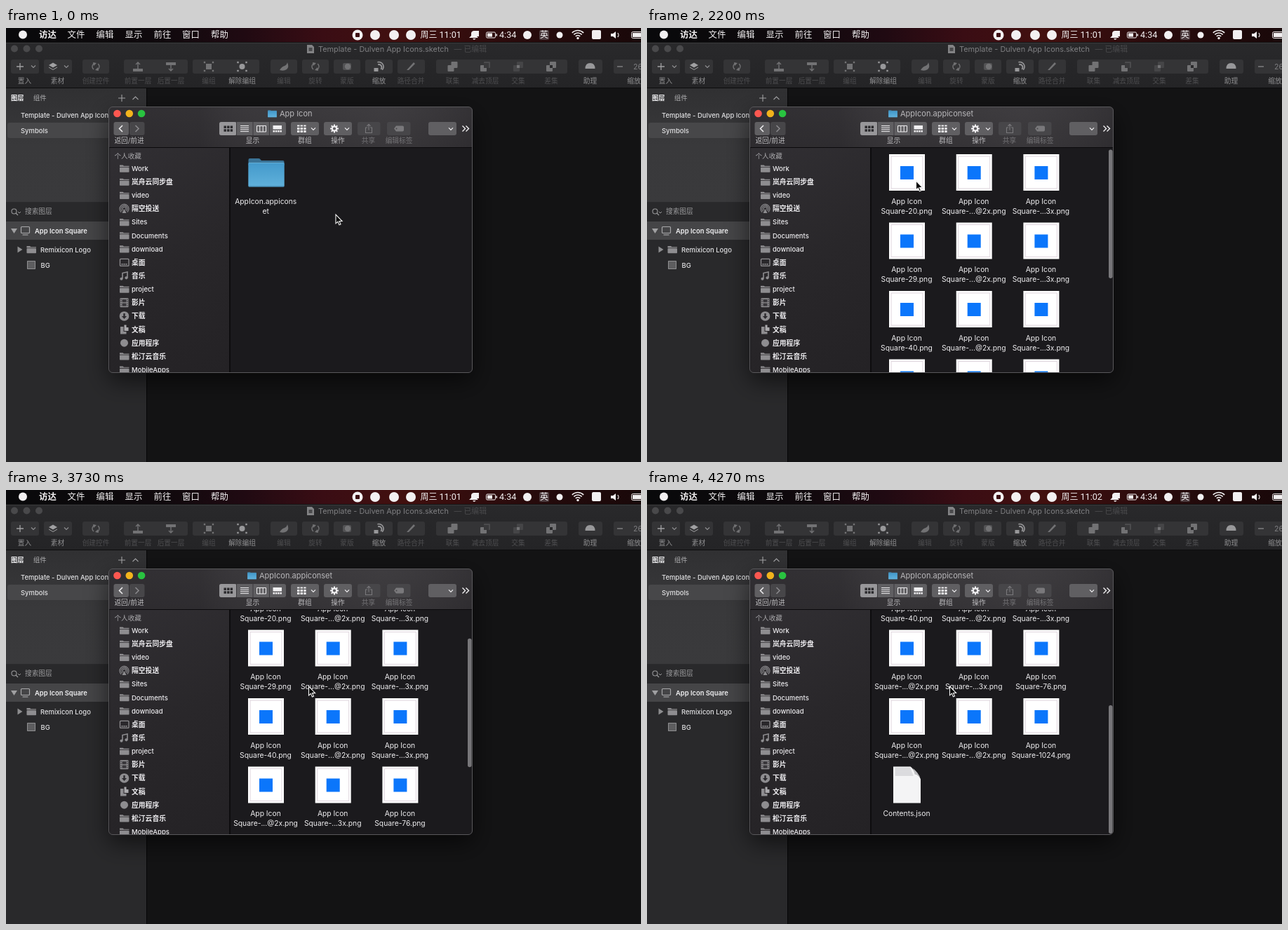
Recreate the animation shown at these times as an HTML page with a canvas. Size 905 by 619 pixels, loop 4340 ms.

```html
<!DOCTYPE html>
<html lang="zh-CN">
<head>
<meta charset="utf-8">
<title>Icon folder</title>
<style>
html, body { margin: 0; width: 100%; height: 100%; overflow: hidden; background: #131314; }
canvas { display: block; width: 905px; height: 619px; }
</style>
</head>
<body>
<canvas id="stage" width="905" height="619"></canvas>
<script>
const ctx = document.getElementById('stage').getContext('2d');
const LOOP = 4340, TICK = 1000 / 15;
const SANS = 'Inter, "Noto Sans CJK SC", "Noto Sans CJK", sans-serif';

// ---------- helpers ----------
function rect(x, y, w, h, color, r = 0) {
  ctx.fillStyle = color;
  ctx.beginPath();
  ctx.roundRect(x, y, w, h, r);
  ctx.fill();
}
function frame(x, y, w, h, color, r = 0, lw = 1) {
  ctx.strokeStyle = color;
  ctx.lineWidth = lw;
  ctx.beginPath();
  ctx.roundRect(x, y, w, h, r);
  ctx.stroke();
}
function disc(x, y, r, color) {
  ctx.fillStyle = color;
  ctx.beginPath();
  ctx.arc(x, y, r, 0, 7);
  ctx.fill();
}
function arc(x, y, r, a, b, color, lw = 1) {
  ctx.strokeStyle = color;
  ctx.lineWidth = lw;
  ctx.beginPath();
  ctx.arc(x, y, r, a, b);
  ctx.stroke();
}
function shape(x, y, d, fill, stroke, lw = 1) {
  const p = new Path2D(d);
  ctx.save();
  ctx.translate(x, y);
  if (fill) { ctx.fillStyle = fill; ctx.fill(p); }
  if (stroke) { ctx.strokeStyle = stroke; ctx.lineWidth = lw; ctx.stroke(p); }
  ctx.restore();
}
const line = (x, y, d, color, lw = 1) => shape(x, y, d, null, color, lw);
// y is the optical middle of the capitals
function text(s, x, y, size, color, { weight = 400, align = 'left', font = SANS } = {}) {
  ctx.font = `${weight} ${size}px ${font}`;
  ctx.textAlign = align;
  ctx.fillStyle = color;
  ctx.fillText(s, x, y + size * 0.36);
}
const label = (s, x, y, size, color, weight) => text(s, x, y, size, color, { weight, align: 'center' });
function ramp(x0, y0, x1, y1, ...stops) {
  const g = ctx.createLinearGradient(x0, y0, x1, y1);
  stops.forEach((c, i) => g.addColorStop(i / (stops.length - 1), c));
  return g;
}
const chevron = (x, y, c) => line(x, y, 'M-3 -1.5L0 1.5L3 -1.5', c, 1.2);

// ---------- motion ----------
// keys: [tick, value, ...]; eased between neighbours
function track(keys, t) {
  if (t <= keys[0][0]) return keys[0].slice(1);
  for (let i = 1; i < keys.length; i++) {
    const a = keys[i - 1], b = keys[i];
    if (t <= b[0]) {
      const u = (t - a[0]) / (b[0] - a[0]);
      const e = b[0] - a[0] > 2 ? u * u * (3 - 2 * u) : u;
      return a.slice(1).map((v, k) => v + (b[k + 1] - v) * e);
    }
  }
  return keys[keys.length - 1].slice(1);
}
const POINTER = [[0, 470, 266], [8, 385, 218.5], [14, 383.5, 218], [34, 383.5, 218],
  [39, 385.5, 219], [43, 431.5, 280.5], [64, 431.5, 280]];
const SCROLL = [[47, 0], [48, 9], [50, 43], [52, 66], [55, 66], [56, 78], [57, 142], [58, 218],
  [59, 264], [60, 277], [61, 278], [64, 273]];
const SELECT = 20, OPEN = 31, MINUTE = 62;

// ---------- menu bar ----------
function menuBar(tick) {
  const white = '#f2f0f1';
  rect(0, 0, 905, 20, ramp(0, 0, 905, 0, '#09090b', '#0b090b', '#10090d', '#200a12', '#3a0d14', '#42100f', '#300c0d', '#220a0b', '#190809'));
  rect(0, 20, 905, 1, '#141415');
  disc(24, 9.5, 6, white);
  ['访达', '文件', '编辑', '显示', '前往', '窗口', '帮助'].forEach((s, i) =>
    label(s, [59.5, 100, 141, 182, 223, 263.5, 304.5][i], 9.5, 12.4, white, i ? 500 : 700));

  disc(501, 10, 7.5, white);
  rect(498, 7, 6, 6, '#3c0e14', 1);
  [526, 553, 577].forEach(x => disc(x, 10, 7, white));
  text('周三', 590.5, 9.7, 12, white, { weight: 500 });
  const clock = { font: 'Roboto, sans-serif' };
  text(tick < MINUTE ? '11:01' : '11:02', 617.5, 9.9, 12.6, white, clock);
  shape(667, 10, 'M-7 4L-4 1V-3Q-3 -6 0 -6H7V2H4L6 4Z M-2 5H3L0 7Z', white);
  frame(684.5, 6, 13, 8, white, 1.5);
  rect(686, 7.5, 7, 5, white);
  rect(698.5, 8.5, 1.5, 3, white);
  text('4:34', 703, 9.9, 12.6, white, clock);
  disc(743, 10, 6, white);
  rect(760, 3, 14, 14, '#4a393c', 2);
  label('英', 767, 9.8, 12, white);
  disc(789, 10, 4.5, white);
  for (const r of [4.5, 8, 11.5]) arc(815, 15, r, -2.36, -0.78, white, 1.7);
  disc(815, 14.5, 1.7, white);
  rect(835, 3, 13, 13, white, 2);
  shape(866, 10, 'M-4 -2H-1L3 -5V5L-1 2H-4Z', white);
  arc(869, 10, 4, -0.8, 0.8, white, 1.2);
  frame(891.5, 5.5, 20, 9, white, 2);
  rect(893, 7, 12, 6, white);
}

// ---------- editor behind ----------
const ON = '#909092', OFF = '#4e4e50', GLYPH = '#727274';

function toolIcon(kind, x, c) {
  const y = 55;
  switch (kind) {
    case 'stack':
      shape(x, y, 'M-6 -2L0 -5.5L6 -2L0 1.5Z', c);
      line(x, y, 'M-6 1L0 4.5L6 1', c);
      break;
    case 'turn':
      arc(x, y, 5, 2.2, 4.4, c, 1.4);
      arc(x, y, 5, -0.9, 1.3, c, 1.4);
      shape(x, y, 'M-4 -6L1 -5L-3 -1Z M4 6L-1 5L3 1Z', c);
      break;
    case 'up':
    case 'down':
      rect(x - 7, kind === 'up' ? 58 : 49, 14, 4, c);
      line(x, y, kind === 'up' ? 'M0 3V-5M-3 -3L0 -6L3 -3' : 'M0 -3V6M-3 3L0 6L3 3', c, 1.4);
      break;
    case 'group':
    case 'ungroup':
      rect(x - 4, y - 4, 8, 8, c, kind === 'group' ? 0 : 4);
      for (const a of [-6, 6]) for (const b of [-6, 6]) rect(x + a - 1.2, y + b - 1.2, 2.4, 2.4, c);
      break;
    case 'leaf':
      shape(x, y, 'M-6 5Q-3 0 1 -1Q4 -2 5 -6Q8 1 4 4Q0 7 -6 5Z', c);
      break;
    case 'mask':
      rect(x - 6, y - 5, 12, 10, '#525254', 2);
      disc(x + 1, y, 4.2, c);
      break;
    case 'scale':
      shape(x, y, 'M-7 2H-1V7H-7Z', c);
      arc(x, y + 1, 4, -1.9, 0.8, c, 2);
      arc(x, y, 6.5, -1.9, 0.8, c, 1.6);
      break;
    case 'cut':
      shape(x, y, 'M-6 5L4 -6L6 -4L-3 5Z', c);
      break;
    case 'dome':
      shape(x, y, 'M-7 3Q-7 -5 0 -5Q7 -5 7 3Z', c);
      break;
    default: { // boolean operations
      const lit = { union: [c, c], minus: ['#4b4b4d', c], cross: ['#454547', '#454547'], diff: [c, c] }[kind];
      rect(x - 2, y - 7, 9, 9, lit[0], 1);
      rect(x - 7, y - 2, 9, 9, lit[1], 1);
      if (kind === 'minus') rect(x - 2, y - 5, 7, 7, '#39393b');
      if (kind === 'cross' || kind === 'diff') rect(x - 2, y - 2, 4, 4, kind === 'cross' ? c : '#29292b');
    }
  }
}

function editor() {
  rect(0, 21, 905, 598, '#131314');
  rect(0, 21, 905, 65, ramp(0, 21, 0, 86, '#29292b', '#242426'));
  rect(0, 21, 905, 1, '#39393b');
  rect(0, 85, 905, 1, '#0c0c0d');
  for (const x of [12, 29.5, 47]) disc(x, 29.5, 5, '#49494b');
  shape(434, 30, 'M-5 -6H2L5 -3V6H-5Z', '#838385');
  rect(431.5, 28, 5, 5, '#4a4a4c');
  text('Template - Dulven App Icons.sketch', 445, 30, 10.9, '#7e7e80');
  text('— 已编辑', 638.5, 30, 10.9, '#4a4a4c');

  for (const [x, w] of [[7, 40], [54, 40], [109, 38], [168, 91], [266, 95], [377, 38], [422, 38],
    [467, 38], [512, 39], [558, 39], [613, 187], [816, 34], [866, 45]])
    rect(x, 45, w, 20, '#343436', 3);
  line(20, 55, 'M-5 0H5M0 -5V5', '#a0a0a2', 1.3);
  chevron(39, 55, '#8e8e90');
  toolIcon('stack', 67, '#a0a0a2');
  chevron(86, 55, '#8e8e90');
  const tools = [
    ['创建控件', 128, 'turn'], ['前置一层', 188, 'up'], ['后置一层', 235, 'down'], ['编组', 289, 'group'],
    ['解除编组', 336.5, 'ungroup', 1], ['编辑', 396, 'leaf'], ['旋转', 441, 'turn'], ['蒙版', 486, 'mask'],
    ['缩放', 531.5, 'scale', 1], ['路径合并', 577, 'cut'], ['联集', 636.5, 'union'], ['减去顶层', 683, 'minus'],
    ['交集', 730, 'cross'], ['差集', 777, 'diff'], ['助理', 832.5, 'dome', 1]];
  for (const [s, x, kind, on] of tools) {
    toolIcon(kind, x, on ? '#98989a' : GLYPH);
    label(s, x, 76, 9.7, on ? ON : OFF);
  }
  label('置入', 26.5, 76, 9.7, ON);
  label('素材', 73.5, 76, 9.7, ON);
  label('缩放', 895, 76, 9.7, ON);
  line(875, 55, 'M-4 0H4', '#8a8a8c', 1.3);
  text('26', 894, 55, 10.5, '#7e7e80');

  // layer panel
  rect(0, 86, 200, 533, '#29292b');
  rect(0, 86, 200, 162, ramp(0, 86, 0, 248, '#303032', '#39393b', '#3a3a3c'));
  rect(2, 135, 197, 22, '#474749', 3);
  rect(0, 248, 200, 1, '#2b2b2d');
  rect(0, 276, 200, 26, '#454547');
  rect(200, 86, 1, 533, '#060607');
  const w5 = { weight: 500 }, ink = '#e2e2e4';
  text('图层', 7, 100, 9.3, '#f2f2f4', { weight: 700 });
  text('组件', 39, 100, 9.3, '#b0b0b2', w5);
  line(165, 100, 'M-5 0H5M0 -5V5', '#a5a5a7', 1.1);
  line(184.5, 100, 'M-4 2L0 -2L4 2', '#a5a5a7', 1.1);
  text('Template - Dulven App Icons', 21, 125, 9.45, ink, w5);
  text('Symbols', 21, 146.5, 9.45, ink, w5);
  arc(11.5, 261.5, 3.5, 0, 7, '#98989a', 1.1);
  line(14, 264, 'M0 0L3 3', '#98989a', 1.2);
  line(19, 263, 'M-2 -1L0 1L2 -1', '#98989a');
  text('搜索图层', 27, 262, 9.7, '#9c9c9e');
  shape(11.5, 289, 'M-4.5 -3H4.5L0 4Z', '#a0a0a2');
  frame(21.5, 283.5, 12, 9, '#a8a8aa', 1, 1.2);
  line(27.5, 293, 'M-4 2H4', '#a8a8aa', 1.2);
  text('App Icon Square', 41, 289.3, 9.4, '#f0f0f2', { weight: 600 });
  shape(19.5, 316, 'M-3 -4.5L4 0L-3 4.5Z', '#8d8d8f');
  folderGlyph(29.5, 316);
  text('Remixicon Logo', 49, 316.5, 9.45, ink, w5);
  rect(30, 332, 12, 12, '#5d5d5f');
  frame(30.5, 332.5, 11, 11, '#8f8f91');
  text('BG', 49.5, 338.3, 9.45, ink, w5);
}

// ---------- file window ----------
const GREY = '#8e8d90';
function folderGlyph(x, y) {
  shape(x, y, 'M0 -5H4.5L6 -3.8H13.5V-2.6H0Z', GREY);
  rect(x, y - 1.8, 13.5, 7, GREY, 0.8);
}
function folder(x, y, k) {
  ctx.save();
  ctx.translate(x, y);
  ctx.scale(k, k);
  shape(0, 0, 'M0.5 4V2Q0.5 0 2.5 0H15Q17 0 18 2L19 3H49.5Q51.5 3 51.5 5V10H0.5Z', '#3a7396');
  rect(0.3, 6, 51.4, 34.5, ramp(0, 6, 0, 40, '#4399cb', '#60b1db'), 1.5);
  rect(1, 6, 50, 1, '#64afd6');
  rect(1, 39.5, 50, 1, '#3d7fa6');
  ctx.restore();
}

const PLACES = ['Work', '岚舟云同步盘', 'video', '隔空投送', 'Sites', 'Documents', 'download', '桌面', '音乐',
  'project', '影片', '下载', '文稿', '应用程序', '松汀云音乐', 'MobileApps'];
const SPECIAL = {
  隔空投送(x, y) {
    for (const r of [2.5, 4.5, 6.5]) arc(x, y, r, 2.3, 7.1, GREY, 1.1);
    shape(x, y, 'M0 0L3 6H-3Z', GREY);
  },
  桌面(x, y) {
    frame(x - 6, y - 5, 12.5, 10, GREY, 1, 1.3);
    line(x, y + 2.5, 'M-4 0H-2M-1 0H1M2 0H4', GREY, 1.8);
  },
  音乐(x, y) {
    line(x, y, 'M-2.5 4V-4L4.5 -5.5V2.5', GREY, 1.6);
    disc(x - 4, y + 4.2, 2.1, GREY);
    disc(x + 3, y + 2.8, 2.1, GREY);
  },
  影片(x, y) {
    rect(x - 6, y - 6.5, 12, 13, GREY, 1);
    for (const b of [-4.8, 0.7]) rect(x - 3, y + b, 6, 4.2, '#39373b');
    for (let i = 0; i < 4; i++) for (const a of [-5.2, 3.8]) rect(x + a, y - 5 + i * 2.8, 1.4, 1.4, '#39373b');
  },
  下载(x, y) {
    disc(x, y, 6.8, GREY);
    shape(x, y, 'M-1.2 -4H1.2V0H3.6L0 4L-3.6 0H-1.2Z', '#2c2a2e');
  },
  文稿(x, y) {
    shape(x, y, 'M-5.5 -4H-1V3H3V6.5H-5.5Z', GREY);
    shape(x, y, 'M0 -6.5H3V-3H6V2H0Z', '#aaa9ac');
  },
  应用程序(x, y) { disc(x, y, 5.5, GREY); }
};

function sidebar() {
  rect(148, 171, 170, 320, ramp(148, 171, 318, 491, '#312f33', '#29272a', '#242225'));
  text('个人收藏', 154.5, 183, 9.6, '#a9a8ab', { weight: 500 });
  PLACES.forEach((name, i) => {
    const y = 200.5 + i * 19.13;
    const latin = /[a-z]/.test(name);
    if (SPECIAL[name]) SPECIAL[name](168.5, y);
    else folderGlyph(162, y);
    text(name, 179, y, latin ? 9.5 : 9.8, '#eeedf0', { weight: latin ? 500 : 600 });
  });
  rect(318, 171, 2, 320, '#0d0c0e');
}

function toolbar(selected, opened) {
  rect(147, 113, 518, 58, ramp(0, 113, 0, 171, '#39373a', '#353336', '#312f32'));
  rect(147, 113, 518, 58, ramp(147, 0, 665, 0, '#2a282c88', '#2a282c66', '#56545811', '#56545833', '#2a282c55'));
  rect(147, 170, 518, 1, '#0b0a0c');
  ['#fc5750', '#f2b31c', '#29c340'].forEach((c, i) => disc(158.5 + i * 17.3, 122, 5.3, c));

  folder(opened ? 344 : 373, 117, 0.25);
  text(opened ? 'AppIcon.appiconset' : 'App Icon', opened ? 361 : 390, 122.5, 11, '#b9b8bb');

  const btn = '#605f62', dim = '#474649', ink = '#f0eff1', faint = '#79787b';
  const live = selected ? btn : dim, mark = selected ? ink : faint;
  rect(153.5, 134, 21.5, 19, btn, 3);
  rect(176, 134, 21.5, 19, dim, 3);
  line(164, 143.5, 'M2 -4.5L-2.5 0L2 4.5', ink, 1.5);
  line(186.5, 143.5, 'M-2 -4.5L2.5 0L-2 4.5', '#8b8a8d', 1.5);

  rect(304, 134, 95, 19, btn, 3);
  rect(304, 134, 24.5, 19, '#98979a', 3);
  for (const x of [328, 351.5, 375]) rect(x, 134, 1, 19, '#3a393c');
  for (let r = 0; r < 2; r++) for (let c = 0; c < 3; c++) rect(310.5 + c * 4.6, 139.5 + r * 4.8, 3.4, 3.4, '#29282b');
  line(340, 143.5, 'M-6 -4H6M-6 -1.3H6M-6 1.4H6M-6 4.1H6', ink);
  frame(357.5, 139.5, 13, 8.5, ink);
  line(364, 143.5, 'M-2.2 -4V4.5M2.2 -4V4.5', ink);
  rect(380.5, 139, 12.5, 5.5, ink);
  for (let i = 0; i < 4; i++) rect(380.5 + i * 3.3, 146, 2.5, 2.5, ink);

  for (const [x, w, c] of [[406, 40, btn], [453, 40, btn], [501, 32.5, live], [543, 33.5, live], [602, 40, btn]])
    rect(x, 134, w, 19, c, 3);
  for (let c = 0; c < 3; c++) {
    rect(415 + c * 4.6, 138.5, 3.4, 2, ink);
    for (let r = 0; r < 2; r++) rect(415 + c * 4.6, 142 + r * 4, 3.4, 3, ink);
  }
  for (const x of [438, 486, 634]) chevron(x, 143.8, ink);
  for (let i = 0; i < 8; i++) {
    const a = i * Math.PI / 4, ux = Math.cos(a), uy = Math.sin(a);
    line(468, 143.5, `M${ux * 3} ${uy * 3}L${ux * 6} ${uy * 6}`, ink, 2);
  }
  arc(468, 143.5, 3.2, 0, 7, ink, 2.2);
  line(517, 143.5, 'M-2 -1.5H-4.5V6H4.5V-1.5H2M0 2V-6M-2.6 -3.6L0 -6.2L2.6 -3.6', mark, 1.1);
  shape(560, 143.5, 'M-7 0L-4 -4H5Q7 -4 7 -2V2Q7 4 5 4H-4Z', mark);
  disc(556.5, 143.5, 1, live);
  line(655, 143.5, 'M-4.5 -4L-0.5 0L-4.5 4M0.5 -4L4.5 0L0.5 4', ink, 1.4);

  const name = '#bdbcbf', soft = selected ? name : '#757477';
  label('返回/前进', 175.5, 161, 9.7, name);
  label('显示', 351.5, 161, 9.7, name);
  label('群组', 426, 161, 9.7, name);
  label('操作', 473, 161, 9.7, name);
  label('共享', 516.5, 161, 9.7, soft);
  label(selected ? '添加标签' : '编辑标签', 560, 161, 9.7, soft);
}

function singleFolder(selected) {
  if (selected) {
    rect(339, 176, 63, 61, '#353437', 3);
    rect(323, 239, 95, 16, '#0a53d0', 3);
    rect(362, 252, 17, 16, '#0a53d0', 3);
  }
  folder(345, 186, 1);
  label('AppIcon.appicons', 370.2, 247, 10.3, '#efeef0');
  label('et', 370.2, 261, 10.3, '#efeef0');
}

const FILES = ['20', '...@2x', '...3x', '29', '...@2x', '...3x', '40', '...@2x', '...3x',
  '...@2x', '...3x', '76', '...@2x', '...@2x', '1024'];
function iconGrid(scroll) {
  const at = i => [370.5 + (i % 3) * 95.7, 206 + Math.floor(i / 3) * 97.5 - scroll];
  FILES.forEach((f, i) => {
    const [x, y] = at(i);
    rect(x - 25.5, y - 26, 51, 52, '#ffffff');
    frame(x - 22.5, y - 23, 45, 46, '#d8ccd6', 0, 0.8);
    rect(x - 9.5, y - 9, 19, 19, '#0b76fb');
    label('App Icon', x - 0.5, y + 41, 10.3, '#efeef0');
    label(`Square-${f}.png`, x - 0.5, y + 55, 10.3, '#efeef0');
  });
  const [x, y] = at(15);
  shape(x, y, 'M-19.5 -26H5Q9 -23 12 -16Q18 -13 19.5 -8V26H-19.5Z', '#f4f4f5');
  shape(x, y, 'M5 -26Q10 -24 11 -15Q18 -14 19.5 -8Q17 -18 5 -26Z', '#bfbfc2');
  for (let i = 0; i < 6; i++) rect(x - 17, y - 24 + i * 2, 22 + i * 0.8, 0.8, '#b4b4b8');
  label('Contents.json', x - 0.5, y + 41, 10.3, '#efeef0');
}

function scrollBar(tick, scroll) {
  const top = 173.5 + scroll * 0.489;
  const end = Math.min(490, top + 183.5);
  // fades out until the first swipe
  ctx.globalAlpha = tick < 47 ? Math.max(0, Math.min(1, (43 - tick) / 3)) : 1;
  rect(658, top, 5.5, end - top, '#777679', 2.7);
  ctx.globalAlpha = 1;
}

function fileWindow(tick) {
  const opened = tick >= OPEN, selected = !opened && tick >= SELECT;
  ctx.save();
  ctx.shadowColor = 'rgba(0,0,0,.6)';
  ctx.shadowBlur = 34;
  ctx.shadowOffsetY = 12;
  rect(147, 113, 518, 378, '#1b1a1d', 5);
  ctx.restore();

  ctx.save();
  ctx.beginPath();
  ctx.roundRect(147, 113, 518, 378, 5);
  ctx.clip();
  sidebar();
  ctx.save();
  ctx.beginPath();
  ctx.rect(320, 171, 345, 320);
  ctx.clip();
  if (opened) {
    const [scroll] = track(SCROLL, tick);
    iconGrid(scroll);
    scrollBar(tick, scroll);
  } else singleFolder(selected);
  ctx.restore();
  toolbar(selected, opened);
  ctx.restore();
  frame(146.5, 112.5, 518, 379, '#59585b', 5.5);
}

function pointer(tick) {
  const [x, y] = track(POINTER, tick);
  shape(x, y, 'M0 0V12.8L2.9 10.2L4.9 14.9L7 14L5 9.5H9.1Z', '#050505', '#f5f5f5', 1.1);
}

function draw(now) {
  const t = now % LOOP;
  const tick = Math.min(64, Math.floor((t + 3.4) / TICK));
  editor();
  menuBar(tick);
  fileWindow(tick);
  pointer(tick);
}

let start = null;
function loop(now) {
  if (start === null) start = now;
  draw(now - start);
  requestAnimationFrame(loop);
}
draw(0);
requestAnimationFrame(loop);
</script>
</body>
</html>
```
